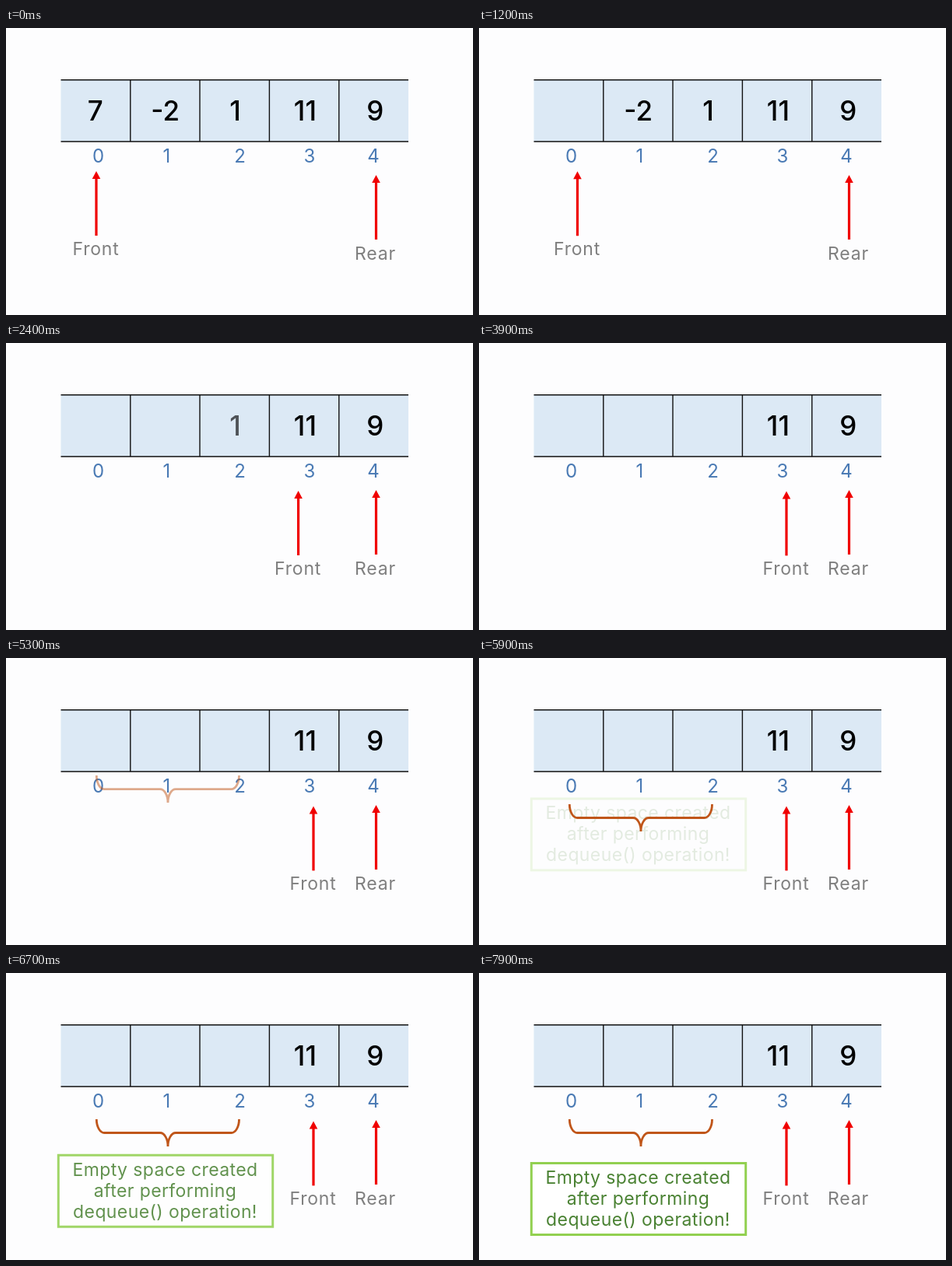
An HTML page that plays this animation: 600x369 px, repeating every 8000 ms.

```html
<!DOCTYPE html>
<html lang="en">
<head>
<meta charset="utf-8">
<title>Queue dequeue</title>
<style>
  html, body { margin: 0; height: 100%; overflow: hidden; background: #fdfdfe; }
  svg { display: block; width: 600px; height: 369px; font-family: Inter, Lato, sans-serif; text-anchor: middle; }
  .value { font-size: 35px; font-weight: 500; }
  .index { font-size: 24px; fill: #4a7ab4; }
  .label { font-size: 23px; fill: #7f7f7f; letter-spacing: .8px; }
  .note { font-size: 23px; fill: #4a8233; letter-spacing: .4px; }
</style>
</head>
<body>
<svg viewBox="0 0 600 369">
  <defs>
    <g id="arrow">
      <path d="M0 7V83" stroke="#f00000" stroke-width="3.2"/>
      <path d="M0 0L5.3 10H-5.3Z" fill="#f00000"/>
    </g>
  </defs>
  <rect x="70.5" y="67" width="446.5" height="79" fill="#dce9f5"/>
  <path d="M70.5 66.8H517M70.5 146H517M159.8 67V146M249 67V146M338.4 67V146M427.8 67V146" stroke="#111" stroke-width="1.4"/>
  <g id="cells"></g>
  <g id="front">
    <use href="#arrow" x="116" y="184"/>
    <text class="label" x="115.5" y="291.7">Front</text>
  </g>
  <use href="#arrow" x="475.5" y="189"/>
  <text class="label" x="474.5" y="298">Rear</text>
  <g id="note" class="note">
    <rect x="67.3" y="244.5" width="275.4" height="92" fill="#fff" stroke="#92d050" stroke-width="3"/>
    <text x="204.5" y="271">Empty space created</text>
    <text x="204.5" y="298">after performing</text>
    <text x="204.5" y="325">dequeue() operation!</text>
  </g>
  <path id="brace" d="M116.3 188A10 17.5 0 0 0 126.3 205.5H198A10 17.5 0 0 1 208 223A10 17.5 0 0 1 218 205.5H289.5A10 17.5 0 0 0 299.5 188"
    fill="none" stroke="#c0561a" stroke-width="2.8"/>
</svg>
<script>
const LOOP = 8000;
const FADE = 450;
const FLOAT = 1110;
const $ = id => document.getElementById(id);
const progress = (t, start, length) => Math.min(1, Math.max(0, (t - start) / length));

function addText(cls, x, y, text) {
  const el = document.createElementNS("http://www.w3.org/2000/svg", "text");
  el.setAttribute("class", cls);
  el.setAttribute("x", x);
  el.setAttribute("y", y);
  el.textContent = text;
  return $("cells").appendChild(el);
}

const values = ["7", "-2", "1", "11", "9"].map((v, i) => addText("value", 114.7 + i * 89.9, 119.3, v));
[118.5, 206.5, 300.5, 390, 472].forEach((x, i) => addText("index", x, 172.6, i));

// Fade in while dropping into place
function floatIn(el, t, start) {
  const p = progress(t, start, FLOAT);
  el.setAttribute("opacity", p);
  el.setAttribute("transform", `translate(0 ${-74 * (1 - p)})`);
}

function draw(now) {
  const t = now % LOOP;
  for (let i = 0; i < 3; i++)
    values[i].setAttribute("opacity", 1 - progress(t, 750 + i * 745, FADE));

  const move = (1 - Math.cos(Math.PI * progress(t, 990, 1700))) / 2;
  $("front").setAttribute("transform", `translate(${279 * move} ${6.4 * move})`);

  floatIn($("brace"), t, 4745);
  floatIn($("note"), t, 5745);
  requestAnimationFrame(draw);
}
draw(0);
</script>
</body>
</html>
```
